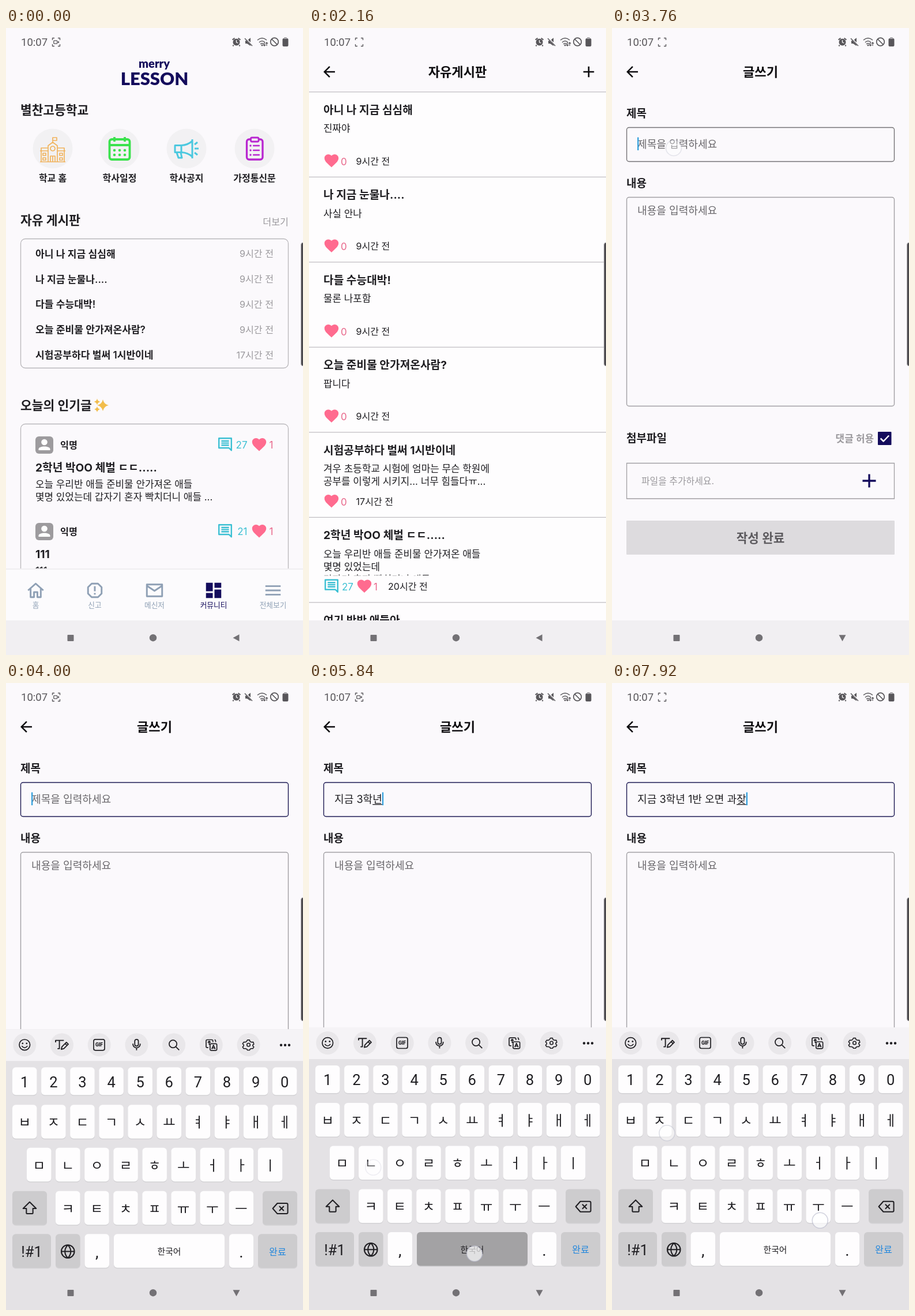
An HTML page with a canvas that plays this animation: 515 px wide and 1087 px high, repeating every 8 s.

```html
<!DOCTYPE html>
<html lang="ko">
<head>
<meta charset="utf-8">
<style>
html, body { margin: 0; width: 100%; height: 100%; overflow: hidden; background: #fbf9fc; }
canvas { display: block; width: 515px; height: 1087px; }
</style>
</head>
<body>
<canvas id="stage"></canvas>
<script>
const W = 515, H = 1087, LOOP = 8000, NAV_TOP = 1027;
const canvas = document.getElementById("stage");
const ctx = canvas.getContext("2d");
const dpr = window.devicePixelRatio || 1;
canvas.width = W * dpr;
canvas.height = H * dpr;

const APP = "Inter, 'Noto Sans CJK KR', 'Noto Sans CJK', sans-serif";
const SYS = "Roboto, 'Noto Sans CJK KR', 'Noto Sans CJK', sans-serif";
const BG = "#fbf9fc", INK = "#1f1e22", GRAY = "#9b999d", NAVY = "#140c5c";
const CYAN = "#3cc0d3", PINK = "#ff6b8f", SLATE = "#8fa0b5", BLACK = "#0c0b0e";

const PATHS = {
  heart: "M12 21.35l-1.45-1.32C5.4 15.36 2 12.28 2 8.5 2 5.42 4.42 3 7.5 3c1.74 0 3.41.81 4.5 2.09C13.09 3.81 14.76 3 16.5 3 19.58 3 22 5.42 22 8.5c0 3.78-3.4 6.86-8.55 11.54z",
  comment: "M3 3H21V20.5L17.5 17H3zM6.5 7H17.5M6.5 10H17.5M6.5 13H17.5",
  back: "M20 11H7.83l5.59-5.59L12 4l-8 8 8 8 1.41-1.41L7.83 13H20z",
  plus: "M19 13h-6v6h-2v-6H5v-2h6V5h2v6h6z",
  home: "M3 12L12 4l9 8M6 10v10h4v-6h4v6h4V10",
  report: "M8.3 4h7.4L20 8.3v7.4L15.7 20H8.3L4 15.7V8.3zM12 7v6M12 15v2",
  mail: "M3 5H21V19H3zM3 6.5l9 6 9-6",
  board: "M3 13h8V3H3zM3 21h8v-6H3zM13 21h8V11h-8zM13 3v6h8V3z",
  menu: "M3 6h18v2H3zM3 11h18v2H3zM3 16h18v2H3z",
  pen: "M2 8V5H15M8 5V18H5M11 19l1-4 7-7 3 3-7 7zM17 10l3 3",
  mic: "M12 3a3 3 0 0 1 3 3v5a3 3 0 0 1-6 0V6a3 3 0 0 1 3-3zM6 10v1a6 6 0 0 0 12 0v-1M12 17v4",
  search: "M17 10.5a6.5 6.5 0 1 1-13 0a6.5 6.5 0 0 1 13 0M15.5 15.5L21 21",
  translate: "M7 17H5Q3 17 3 15V5Q3 3 5 3H13Q15 3 15 5V7M12 10H20Q22 10 22 12V20Q22 22 20 22H12Q10 22 10 20V12Q10 10 12 10M13 19.5l3-7 3 7M14 17.5h4M6 8l2.5-2.5L11 8M8.5 6V12M18 3q2 0 2 4",
  gear: "M10 3h4l1 3 3 1 3 0 1 4-2 1v2l2 2-2 3-3 0-2 1-1 2h-4l-1-2-3-1-3 0-2-3 2-2v-2l-2-2 2-3 3 0 2-1zM15 12a3 3 0 1 1-6 0a3 3 0 0 1 6 0",
  shift: "M12 2L2 12h5v7q0 1 1 1h8q1 0 1-1v-7h5z",
  erase: "M8 4H22q2 0 2 2V18q0 2-2 2H8L1 12zM11 8.5l7 7M18 8.5l-7 7",
  globe: "M22 12a10 10 0 1 1-20 0a10 10 0 0 1 20 0M2 12H22M12 2c-6 6-6 14 0 20c6-6 6-14 0-20"
};

const clamp = v => Math.max(0, Math.min(1, v));
const easeOut = u => 1 - (1 - clamp(u)) ** 3;

// y is the optical middle of the line
function text(s, x, y, size, color = INK, weight = 400, align = "left", family = APP) {
  ctx.font = `${weight} ${size}px ${family}`;
  ctx.textAlign = align;
  ctx.fillStyle = color;
  ctx.fillText(s, x, y + 0.37 * size);
}

function box(x, y, w, h, r, fill, stroke, width = 1.3) {
  ctx.beginPath();
  ctx.roundRect(x, y, w, h, r);
  if (fill) { ctx.fillStyle = fill; ctx.fill(); }
  if (stroke) { ctx.strokeStyle = stroke; ctx.lineWidth = width; ctx.stroke(); }
}

function disc(x, y, r, fill, stroke, width = 1.5) {
  ctx.beginPath();
  ctx.arc(x, y, r, 0, 7);
  if (fill) { ctx.fillStyle = fill; ctx.fill(); }
  if (stroke) { ctx.strokeStyle = stroke; ctx.lineWidth = width; ctx.stroke(); }
}

// A positive line width outlines the path, zero fills it
function draw(path, x, y, scale, color, line = 0, mid = 0) {
  ctx.save();
  ctx.translate(x, y);
  ctx.scale(scale, scale);
  ctx.translate(-mid, -mid);
  const p = new Path2D(path);
  ctx.fillStyle = ctx.strokeStyle = color;
  ctx.lineWidth = line;
  ctx.lineJoin = "round";
  line ? ctx.stroke(p) : ctx.fill(p);
  ctx.restore();
}
const icon = (name, x, y, scale, color, line) => draw(PATHS[name], x, y, scale, color, line, 12);

function clipped(x, y, w, h, paint) {
  ctx.save();
  ctx.beginPath();
  ctx.rect(x, y, w, h);
  ctx.clip();
  paint();
  ctx.restore();
}

function star(x, y, r) {
  draw(`M0 ${-r}Q${r * .18} ${-r * .18} ${r} 0Q${r * .18} ${r * .18} 0 ${r}Q${-r * .18} ${r * .18} ${-r} 0Q${-r * .18} ${-r * .18} 0 ${-r}`, x, y, 1, "#f2bd4b");
}

function shortcuts() {
  [81, 197, 313, 431].forEach((x, i) => {
    disc(x, 209, 34.5, "#f2f1f3");
    text(["학교 홈", "학사일정", "학사공지", "가정통신문"][i], x, 260, 16, INK, 600, "center");
  });
  draw("M-8 22V-6L0-12 8-6V22M0-12V-20H7V-15H0M-8-2H-20V22M8-2H20V22M-22 22H22M-22 3H-8M8 3H22M-4 22V12H4V22M0 12V22M-17 7h5v4h-5zM12 7h5v4h-5zM-17 15h5v4h-5zM12 15h5v4h-5zM4-1a4 4 0 1 1-8 0a4 4 0 0 1 8 0", 81, 210, 1, "#f1b45d", 1.7);
  box(179.5, 193, 35, 35, 4, null, "#3be24d", 3.8);
  draw("M-17-7H17M-9-21V-13M9-21V-13", 197, 210, 1, "#3be24d", 3.8);
  for (let i = 0; i < 6; i++) disc(188 + 9 * (i % 3), 212 + 8 * Math.floor(i / 3), 2.3, "#3be24d");
  draw("M-20-5.5H-9V6.5H-20zM-9-5.5Q2-6 10-13V14Q2 7-9 6.5M-17 7L-14 16H-8L-10 7M10-16V17M14 0H21M14-7L19-11M14 7L19 11", 313, 209, 1, "#4bc8df", 3);
  box(417.5, 193, 27.5, 35, 4, null, "#b826d0", 3.3);
  box(424.5, 190, 13.5, 7, 2, "#f2f1f3", "#b826d0", 2.8);
  for (const y of [204, 212, 220]) {
    disc(424, y, 1.7, "#b826d0");
    box(428, y - 1.3, 12, 2.6, 1, "#b826d0");
  }
}

function hotPost(y, title, lines, comments) {
  box(51, y - 15, 31, 30, 6, "#9d9b9e");
  disc(66.5, y - 5, 5.3, "#fff");
  draw("M-10 9V7C-10 1 10 1 10 7V9z", 66.5, y, 1, "#fff");
  text("익명", 94, y, 16.2, INK, 600);
  icon("comment", 380, y - 1, 1.2, CYAN, 2);
  text(comments, 418.5, y, 17, CYAN, 400, "right");
  icon("heart", 439, y - 1, 1.22, PINK);
  text("1", 463.5, y, 17, "#e8668a", 400, "right");
  text(title, 51, y + 39, 19.2, INK, 700);
  lines.forEach((s, i) => text(s, 51, y + 68 + 22 * i, 16.9));
}

function homePage() {
  box(0, 0, W, NAV_TOP, 0, BG);
  text("merry", 257, 62, 20, NAVY, 900, "center", "Lato, sans-serif");
  text("LESSON", 257.5, 88, 31, NAVY, 900, "center", "Lato, sans-serif");
  text("별찬고등학교", 25, 142, 21.4, INK, 600);
  shortcuts();
  text("자유 게시판", 25, 333, 21.5, INK, 700);
  text("더보기", 490, 336, 16.2, GRAY, 400, "right");
  box(25.5, 365.5, 464, 224, 8, null, "#b9b7bb");
  ["아니 나 지금 심심해", "나 지금 눈물나....", "다들 수능대박!", "오늘 준비물 안가져온사람?", "시험공부하다 벌써 1시반이네"].forEach((s, i) => {
    const y = 391.5 + 43.8 * i;
    text(s, 51, y, 17.1, INK, 600);
    text(i < 4 ? "9시간 전" : "17시간 전", 464, y, 16.1, GRAY, 400, "right");
  });
  text("오늘의 인기글", 25, 654, 21.5, INK, 700);
  star(168, 654, 10);
  star(158, 648, 5.5);
  star(158, 661, 5);
  clipped(0, 0, W, 939, () => {
    box(25.5, 686.5, 464, 400, 8, null, "#b9b7bb");
    hotPost(723, "2학년 박OO 체벌 ㄷㄷ.....", ["오늘 우리반 애들 준비물 안가져온 애들", "몇명 있었는데 갑자기 혼자 빡치더니 애들 ..."], "27");
    hotPost(873, "111", ["111"], "21");
  });
  box(0, 937, W, 2, 0, "#f0eef1");
  box(0, 939, W, 88, 0, "#fcfbfd");
  [["home", "홈", 51.5, 2], ["report", "신고", 154, 2], ["mail", "메신저", 257.5, 2], ["board", "커뮤니티", 360, 0], ["menu", "전체보기", 463, 0]].forEach(([name, label, x, line], i) => {
    const active = i === 3;
    icon(name, x, 975, 1.47, active ? NAVY : SLATE, line);
    text(label, x, 1000, 12.7, active ? NAVY : SLATE, active ? 500 : 400, "center");
  });
}

function header(title) {
  icon("back", 35, 76, 1.25, BLACK);
  text(title, 257.5, 76, 22.1, BLACK, 700, "center");
}

const POSTS = [
  ["아니 나 지금 심심해", "진짜야"],
  ["나 지금 눈물나....", "사실 안나"],
  ["다들 수능대박!", "물론 나포함"],
  ["오늘 준비물 안가져온사람?", "팝니다"],
  ["시험공부하다 벌써 1시반이네", "겨우 초등학교 시험에 엄마는 무슨 학원에", "공부를 이렇게 시키지... 너무 힘들다ㅠ..."],
  ["2학년 박OO 체벌 ㄷㄷ.....", "오늘 우리반 애들 준비물 안가져온 애들", "몇명 있었는데", "갑자기 혼자 빡치더니 애들"],
  ["여기 반반 애들아"]
];

function boardPage() {
  box(0, 0, W, NAV_TOP, 0, "#fefdfe");
  box(0, 0, W, 111, 0, BG);
  header("자유게시판");
  icon("plus", 485, 76, 1.33, BLACK);
  clipped(0, 0, W, NAV_TOP, () => POSTS.forEach(([title, ...lines], i) => {
    const y = 110.7 + 147.5 * i, replies = i === 5;
    box(0, y - .5, W, 1.3, 0, "#c0bec2");
    text(title, 25, y + 31, 19.2, INK, 700);
    clipped(0, y, W, 101, () => lines.forEach((s, n) => text(s, 25, y + 63.5 + 22 * n, 16.9)));
    if (!lines.length) return;
    const shift = replies ? 57 : 0, fy = y + 120.3;
    if (replies) {
      icon("comment", 39, fy - 1, 1.2, CYAN, 2);
      text("27", 57, fy + .5, 17, CYAN);
    }
    icon("heart", 39 + shift, fy - 1, 1.22, PINK);
    text(replies ? "1" : "0", 55 + shift, fy + .5, 17, "#e8668a");
    text(i < 4 ? "9시간 전" : i < 5 ? "17시간 전" : "20시간 전", replies ? 137 : 81.5, fy, 16.1);
  }));
}

// Each word: keys pressed, and the text after each press
const WORDS = [
  ["ㅈㅣㄱㅡㅁ", "ㅈ 지 직 지그 지금"],
  ["3ㅎㅏㄱㄴㅕㄴ", "3 3ㅎ 3하 3학 3학ㄴ 3학녀 3학년"],
  ["1ㅂㅏㄴ", "1 1ㅂ 1바 1반"],
  ["ㅇㅗㅁㅕㄴ", "ㅇ 오 옴 오며 오면"],
  ["ㄱㅗㅏㅈㅏㅈㅜ", "ㄱ 고 과 괒 과자 과잦 과자주"]
];
const PACE = [[0, 4300], [6, 4920], [19, 6570], [20, 6690], [31, 7910]];
const HOLD = 90;

function pressTime(i) {
  const k = Math.max(1, PACE.findIndex(p => p[0] >= i));
  const [i0, t0] = PACE[k - 1], [i1, t1] = PACE[k];
  return t0 + (t1 - t0) * (i - i0) / (i1 - i0);
}

const strokes = [];
let committed = "";
const addStroke = (key, result) => strokes.push({ key, result, time: pressTime(strokes.length) });
WORDS.forEach(([keys, stages], w) => {
  const steps = stages.split(" ");
  [...keys].forEach((key, i) => addStroke(key, committed + steps[i]));
  committed += steps[steps.length - 1] + " ";
  if (w < WORDS.length - 1) addStroke(" ", committed);
});

function writePage(t) {
  box(0, 0, W, NAV_TOP, 0, BG);
  header("글쓰기");
  text("제목", 25, 148, 19, INK, 600);
  text("내용", 25, 269, 19, INK, 600);
  const border = t < 3660 ? "#a19fa3" : t < 3840 ? "#747276" : "#1b1852";
  box(25.5, 172.5, 464, 59, 4, null, border, 1.4);
  box(25.5, 293.5, 464, 362, 4, null, "#a19fa3", 1.4);

  const done = strokes.filter(s => t >= s.time + HOLD);
  const typed = done.length ? done[done.length - 1].result : "";
  text(typed || "제목을 입력하세요", 44, 201, 18.1, typed ? INK : "#69676b");
  const end = typed ? 44 + ctx.measureText(typed).width : 44;
  const last = typed.slice(-1);
  if (last >= "ㄱ") {
    const w = ctx.measureText(last).width;
    box(end - w, 210, w, 1.3, 0, INK);
  }
  if (typed || t >= 3700 && t < 4200) box(end, 189.5, 2.3, 22.5, 0, "#329fdc");

  text("내용을 입력하세요", 44, 316, 18.1, "#69676b");
  text("첨부파일", 25, 711, 19, INK, 600);
  text("댓글 허용", 454, 711.5, 16.9, GRAY, 600, "right");
  box(461, 700, 23.5, 23, 1, NAVY);
  draw("M-7 0L-2 5 7.5-5", 472.7, 711.5, 1, "#fff", 2.5);
  box(25.5, 754.5, 464, 61.5, 0, null, "#a19fa3");
  text("파일을 추가하세요.", 51, 785.5, 15.9, GRAY);
  icon("plus", 446, 785, 1.65, NAVY);
  box(25, 854, 465, 59, 1, "#dddbde");
  text("작성 완료", 257.5, 884, 21.3, "#5c5a5e", 600, "center");
}

const KEYS = [];
[["1234567890", 11, 663, 48], ["ㅂㅈㄷㄱㅅㅛㅕㅑㅐㅔ", 11, 728, 58.5], ["ㅁㄴㅇㄹㅎㅗㅓㅏㅣ", 36, 802.5, 58.5], ["ㅋㅌㅊㅍㅠㅜㅡ", 86, 877.5, 58.5]].forEach(([row, x, y, h]) =>
  [...row].forEach((id, i) => KEYS.push({ id, x: x + 50.1 * i, y, w: 42.5, h })));
[["shift", 11, 877.5, 60], ["erase", 445, 877.5, 60], ["!#1", 11, 952, 67], ["globe", 86, 952, 42.5], [",", 136.5, 952, 42.5], [" ", 187, 952, 192], [".", 387, 952, 42], ["완료", 437, 952, 68]].forEach(([id, x, y, w]) =>
  KEYS.push({ id, x, y, w, h: 58.5, special: !", .".includes(id) }));

function keyCap(key, pressed) {
  const { id, x, y, w, h } = key, cx = x + w / 2, cy = y + h / 2 + 1;
  const label = (s, size, color = INK, weight = 400) => text(s, cx, cy, size, color, weight, "center", SYS);
  box(x, y + 1.5, w, h, 6, "#d3d2d5");
  box(x, y, w, h, 6, pressed ? "#a3a2a4" : key.special ? "#cdccce" : "#fefdfe");
  if (PATHS[id]) icon(id, cx, cy, 1.13, INK, 1.8);
  else if (id === " ") label("한국어", 14.8);
  else if (id === "완료") label(id, 16.2, "#2187dd");
  else if (",.".includes(id)) label(id, 28);
  else if (/[ㄱ-ㅣ]/.test(id)) label(id, 23.5, INK, 500);
  else label(id, 25.5);
}

function keyboard(t) {
  const drop = 490 * (1 - easeOut((t - 3790) / 260));
  ctx.save();
  ctx.translate(0, drop);
  box(0, 597, W, 490, 0, "#e4e2e5");
  box(0, 597, W, 55, 0, "#f5f3f6");
  for (let i = 0; i < 7; i++) disc(32.3 + 64.7 * i, 624, 20, "#e9e7ea");
  disc(32.3, 624, 9.3, null, INK, 1.7);
  disc(28.8, 621.5, 1.4, INK);
  disc(35.8, 621.5, 1.4, INK);
  if (t > 4600 && t < 5600) box(30.3, 625, 4, 5, 2, INK);
  else draw("M-5 2Q0 8 5 2", 32.3, 624, 1, INK, 1.7);
  ["pen", "", "mic", "search", "translate", "gear"].forEach((name, i) => {
    if (name) icon(name, 97 + 64.7 * i, 624, [1.1, 1, 1.05, 1.02, .98, .93][i], INK, 1.7);
  });
  box(152, 614.5, 19, 19, 3, null, INK, 1.7);
  text("GIF", 161.5, 624, 8.5, INK, 800, "center", SYS);
  for (const x of [477, 484, 491]) disc(x, 624.5, 2.2, INK);
  for (const key of KEYS) {
    keyCap(key, strokes.some(s => s.key === key.id && t >= s.time + 20 && t < s.time + HOLD));
  }
  ctx.restore();
}

function touch(t, start, x, y) {
  const age = t - start;
  if (age < 0 || age > HOLD + 110) return;
  ctx.globalAlpha = 1 - clamp((age - HOLD) / 110);
  disc(x, y, 13.5, "rgba(255,255,255,.68)", "rgba(180,182,200,.6)", 1.6);
  ctx.globalAlpha = 1;
}

const NUDGE = { 3: [3, 0], "ㅇ": [8, 8], "ㅗ": [0, -5], "ㅈ": [13, 23], "ㅜ": [3, 25] };

function touches(t) {
  touch(t, 1600, 470, 338);
  touch(t, 2520, 484, 78);
  touch(t, 3620, 107, 208);
  for (const s of strokes) {
    const key = KEYS.find(k => k.id === s.key), [dx, dy] = NUDGE[s.key] || [4, 8];
    touch(t, s.time, key.x + key.w / 2 + dx, key.y + key.h / 2 + dy);
  }
}

function statusBar(t) {
  const c = "#58565a";
  text("10:07", 26, 24, 18.5, c, 400, "left", SYS);
  draw("M-6.5-3.5V-7H-3M3-7H6.5V-3.5M6.5 3.5V7H3M-3 7H-6.5V3.5", 87, 24.5, 1, c, 1.3);
  if (Math.floor(t / 400) % 2 === 0) {
    box(82.8, 21.8, 6, 5.4, 1, null, c, 1.3);
    draw("M0 0L3-2V2z", 89, 24.5, 1, c);
  }
  disc(399.5, 24.5, 6, c);
  draw("M-7-4L-3-7M7-4L3-7M-5 5L-6 7M5 5L6 7", 399.5, 24.5, 1, c, 2);
  draw("M0-3V1L3 2", 399.5, 24, 1, "#fff", 1.3);
  draw("M-6-2H-3L3-7V7L-3 3H-6z", 421, 24, 1, c);
  draw("M-7-7L7 7", 421, 24, 1, BG, 3);
  draw("M-7-6L6 7", 421, 24, 1, c, 1.5);
  draw("M-8-3Q0-10 8-3M-5 1Q0-4 5 1M-3 4Q0 1 3 4", 444, 24, 1, c, 1.5);
  disc(444, 30, 1.4, c);
  draw("M0 0V6M-2 4L0 6 2 4M4 6V0M2 2L4 0 6 2", 448, 25, 1, c, 1.2);
  disc(465.5, 24, 6.8, null, c, 1.7);
  draw("M-5-5L5 5", 465.5, 24, 1, c, 1.7);
  box(479.5, 18, 10, 14, 2, c);
  box(482, 16, 5, 3, 1, "#aaa8ac");
}

function systemNav(down) {
  const c = "#737175";
  box(106.5, 1052, 11, 11, 1, c);
  disc(255, 1057.2, 6.2, c);
  draw(down ? "M-6-5H6L0 6z" : "M5-6V6L-6 0z", 399.5, 1057.2, 1, c);
}

// The new page grows and fades in over the slightly enlarged old one
function pageChange(before, after, u) {
  const e = easeOut(u);
  const zoomed = (scale, alpha, page) => {
    ctx.save();
    ctx.globalAlpha = alpha;
    ctx.translate(W / 2, NAV_TOP / 2);
    ctx.scale(scale, scale);
    ctx.translate(-W / 2, -NAV_TOP / 2);
    page();
    ctx.restore();
  };
  if (u < 1) zoomed(1 + .05 * e, 1, before);
  if (u > 0) zoomed(.85 + .15 * e, clamp(u * 4), after);
}

function render(t) {
  ctx.setTransform(dpr, 0, 0, dpr, 0, 0);
  const write = () => writePage(t);
  box(0, 0, W, H, 0, BG);
  clipped(0, 0, W, NAV_TOP, () => {
    if (t < 2400) pageChange(homePage, boardPage, clamp((t - 1760) / 300));
    else pageChange(boardPage, write, clamp((t - 2700) / 300));
  });
  box(0, NAV_TOP, W, H - NAV_TOP, 0, "#f1eff2");
  statusBar(t);
  if (t > 3790) keyboard(t);
  systemNav(t > 3720);
  box(511.5, 372, 8, 214, 4, "#4d4b4f", "#aaa8ac", 1);
  touches(t);
}

const begin = performance.now();
function tick(now) {
  render(Math.max(0, now - begin) % LOOP);
  requestAnimationFrame(tick);
}
render(0);
requestAnimationFrame(tick);
</script>
</body>
</html>
```
